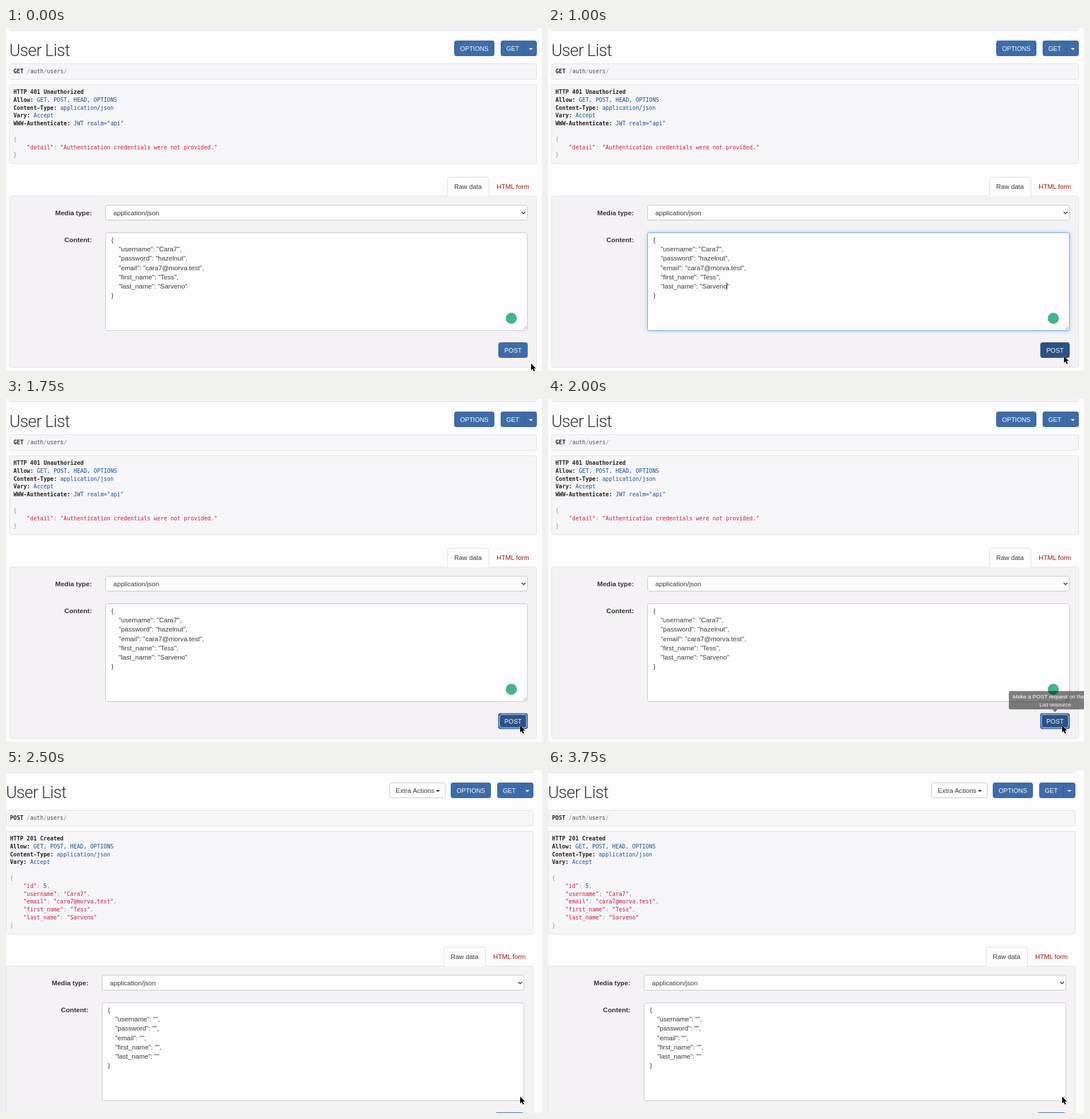
Write an HTML page that moves like this. It is 934 px wide and 599 px high and loops after 4.75 s.

```html
<!DOCTYPE html>
<html lang="en">
<head>
<meta charset="utf-8">
<title>User List</title>
<style>
  html, body { margin: 0; width: 100%; height: 100%; overflow: hidden; background: #fcfcfc; }
  svg { display: block; width: 934px; height: 599px; }
  text { font: 11.6px "Liberation Sans", Arial, sans-serif; fill: #3c3c3c; }
  .title { font: 300 29px Roboto, sans-serif; letter-spacing: -.7px; fill: #333; }
  .mono { font: 9.68px "DejaVu Sans Mono", monospace; fill: #8d9599; }
  .label { font-weight: bold; text-anchor: end; fill: #333; }
  .tab { font-size: 11.4px; }
  .link { fill: #9a1a12; }
  .caps { font-size: 11px; text-anchor: middle; fill: #fff; }
  .tip text { font-size: 9.7px; text-anchor: middle; fill: #fff; }
  .key { font-weight: bold; fill: #222; }
  .value { fill: #1d4f8b; }
  .string { fill: #c71a3c; }
  .word { fill: #48484c; }
  .well { fill: #f6f6f8; stroke: #dfdfe5; }
  .form { fill: #f4f2f4; }
  .field { fill: #fcfcfc; stroke: #c3c3c8; }
  .button { fill: #3d6ca9; stroke: #315f9c; }
  .plain { fill: #fdfdfd; stroke: #c6c6c6; }
</style>
</head>
<body>
<svg id="stage" viewBox="0 0 934 599"></svg>
<script>
const stage = document.getElementById("stage");

const rect = (x, y, w, h, cls, extra = "") =>
  `<rect x="${x + .5}" y="${y + .5}" width="${w - 1}" height="${h - 1}" rx="3" class="${cls}" ${extra}/>`;
const text = (x, y, content, cls = "") =>
  `<text x="${x}" y="${y}" class="${cls}">${content}</text>`;
const span = (cls, content) => `<tspan class="${cls}">${content}</tspan>`;
const indent = line => line.replace(/^ +/, s => "\u00a0".repeat(s.length));
const lines = (x, y, step, list, cls) =>
  list.map((line, i) => text(x, y + i * step, indent(line), cls)).join("");
const triangle = (x, y, color) => `<path d="M${x} ${y}h7l-3.5 3.5z" fill="${color}"/>`;

const header = line => line.replace(/^([^:]+:)(.*)$/, (_, key, value) => span("key", key) + span("value", value));
const json = line => line.replace(/("[^"]*")|(\d+)/g, (token, quoted) => span(quoted ? "string" : "value", token));
const path = method => span("key", method) + " " + ["auth", "users"].map(w => "/" + span("word", w)).join("") + "/";

const user = { username: "Cara7", password: "hazelnut", email: "cara7@morva.test", first_name: "Tess", last_name: "Sarveno" };
const pretty = object => JSON.stringify(object, null, 4).split("\n");

function topBar(method, pathY, status, headers, body) {
  const count = 2 + headers.length + body.length;
  const list = [span("key", status), ...headers.map(header), "", ...body.map(json)];
  return `
    ${rect(6, -10, 919, 15, "well form")}
    ${text(6, 48.5, "User List", "title")}
    ${rect(781, 22, 70, 27, "button")}${text(816, 39.5, "OPTIONS", "caps")}
    ${rect(862, 22, 63, 27, "button")}${text(883, 39.5, "GET", "caps")}
    <path d="M904.5 22v27" stroke="#315f9c"/>${triangle(911, 35, "#fff")}
    ${rect(6, pathY, 919, 28, "well")}${text(13, pathY + 17, path(method), "mono")}
    ${rect(6, pathY + 36.5, 919, count * 13.8 + 14.5, "well")}
    ${lines(13, pathY + 53, 13.8, list, "mono")}`;
}

const form = (content, name) => `
    ${rect(6, 293, 919, 300, "well form")}
    <path d="M769.5 294v-30q0-3.500 3.500-3.500h65q3.500 0 3.500 3.500v30" fill="#fcfcfc" stroke="#dfdfe5"/>
    ${text(781, 281, "Raw data", "tab")}${text(855, 281, "HTML form", "tab link")}
    ${text(149.5, 326.5, "Media type:", "label")}
    ${rect(173, 309, 736, 27, "field")}${text(187, 326.5, "application/json")}
    <path d="M898.500 321l3.300 3.300 3.300-3.300" fill="none" stroke="#333" stroke-width="1.500"/>
    ${text(149.5, 374, "Content:", "label")}
    ${rect(173, 357, 736, 172, "field", `id="${name}Area"`)}
    ${lines(183.5, 374, 16.17, pretty(content))}
    <path d="M901 527l6-6M904.500 527l2.500-2.500" stroke="#777" stroke-width=".8"/>
    ${rect(858, 549, 51, 27, "button", `id="${name}Post"`)}`;
const postLabel = text(883.5, 566.5, "POST", "caps");

const { password, ...created } = user;
const blank = Object.fromEntries(Object.keys(user).map(key => [key, ""]));
const common = ["Allow: GET, POST, HEAD, OPTIONS", "Content-Type: application/json", "Vary: Accept"];

stage.innerHTML = `
  <g id="before">
    ${topBar("GET", 62, "HTTP 401 Unauthorized", [...common, 'WWW-Authenticate: JWT realm="api"'],
      pretty({ detail: "Authentication credentials were not provided." }))}
    ${form(user, "before")}
    <path id="caret" d="M311.800 444.500v13" stroke="#222"/>
    <circle cx="880.500" cy="507" r="9.700" fill="#41b491"/>
    <g id="ring" fill="none">
      ${rect(858, 549, 51, 27, "", 'stroke="#2159bd" stroke-width="1.600"')}
      ${rect(859.5, 550.5, 48, 24, "", 'stroke="#e4ecf8"')}
    </g>
    ${postLabel}
    <g id="tip" class="tip">
      <path d="M806 510h156q3 0 3 3v26q0 3-3 3h-74l-4.500 5-4.500-5h-73q-3 0-3-3v-26q0-3 3-3z"/>
      ${text(884, 523, "Make a POST request on the User")}${text(884, 536.5, "List resource")}
    </g>
  </g>
  <g id="after" transform="translate(-6 0)">
    ${topBar("POST", 70, "HTTP 201 Created", common, pretty({ id: 5, ...created }))}
    ${rect(674, 22, 98, 27, "plain")}${text(685, 39.5, "Extra Actions")}${triangle(755, 35, "#333")}
    <g transform="translate(0 49)">${form(blank, "after")}${postLabel}</g>
  </g>
  <path id="cursor" d="M0 0v11.800l2.700-2.500 2 4.500 2-.9-2-4.400h3.800z" stroke="#fff" stroke-width=".9" paint-order="stroke"/>`;

const el = id => document.getElementById(id);
const show = (id, on) => el(id).style.display = on ? "" : "none";

const pointer = [[915, 586], [912.5, 586.5], [909, 581.5], [909, 580.5], [899, 573], [896, 571.5], [896, 570.5]];

function draw() {
  const t = performance.now() % 4750;
  const tick = Math.floor(t / 250);
  const submitted = t >= 2500;
  const focused = t >= 750 && t < 1750;
  const glow = t < 1000 ? 2 : 3;

  show("before", !submitted);
  show("after", submitted);
  show("caret", t >= 750 && t < 1250);
  show("ring", t >= 1750);

  const area = el("beforeArea").style;
  area.stroke = focused ? "#62a5e8" : "";
  area.filter = focused ? `drop-shadow(0 0 ${glow}px rgba(102,175,233,.6))` : "";
  area.fill = t >= 2000 ? "#fff" : "";

  const post = el("beforePost").style;
  post.fill = t >= 1000 ? "#2c5184" : "";
  post.stroke = t >= 1000 ? "#244872" : "";

  el("tip").style.opacity = t < 2000 ? 0 : t < 2250 ? .5 : .9;
  el("cursor").setAttribute("transform", `translate(${pointer[Math.min(tick, pointer.length - 1)]})`);
  requestAnimationFrame(draw);
}
draw();
</script>
</body>
</html>
```
